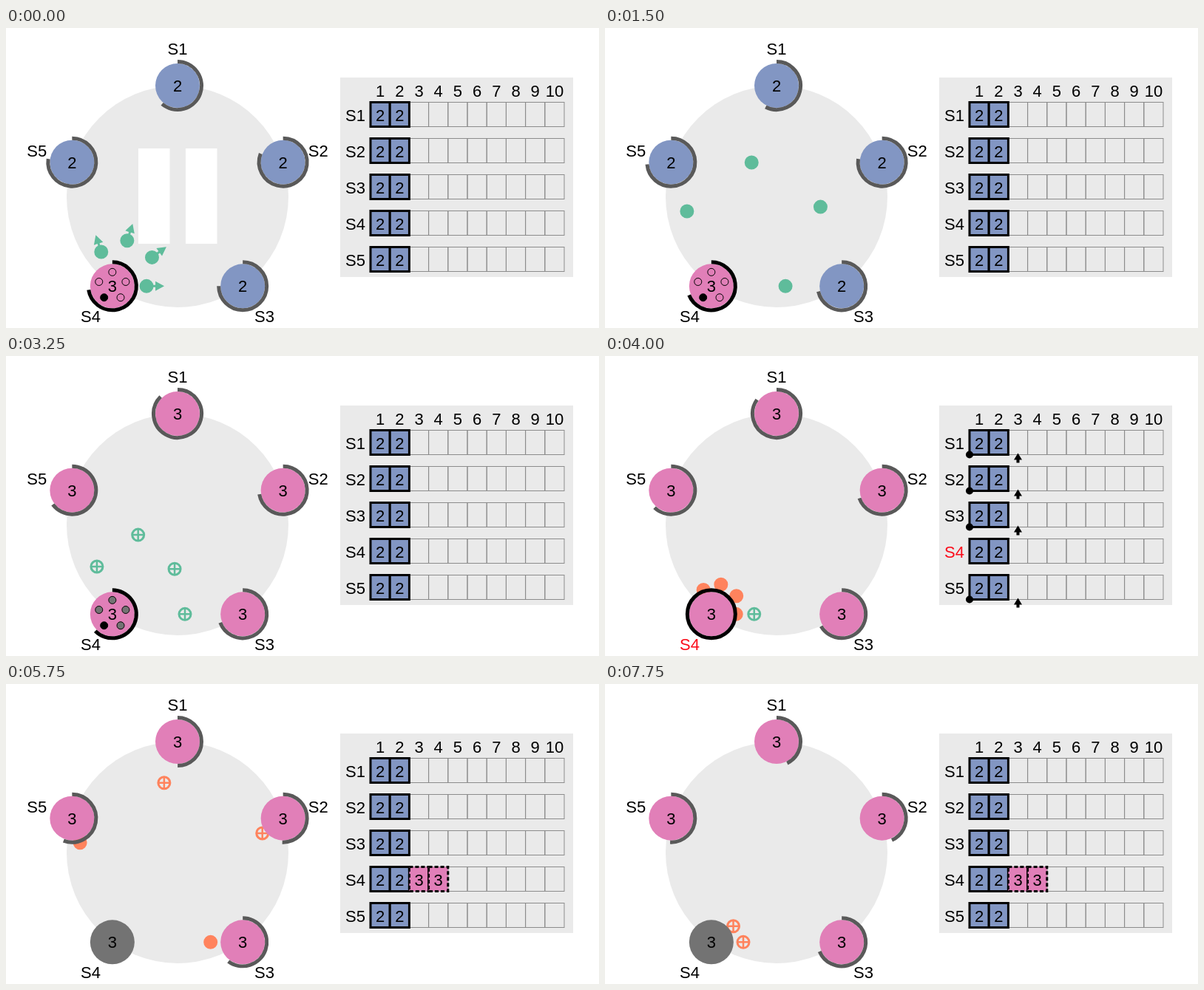
Write an HTML page that moves like this. It is 802 px wide and 406 px high and loops after 8000 ms.

```html
<!DOCTYPE html>
<html lang="en">
<head>
<meta charset="utf-8">
<title>Leader election</title>
<style>
  html, body { margin: 0; width: 100%; height: 100%; overflow: hidden; background: #fff; }
  svg { display: block; width: 100%; height: 100%; }
  text { font: 22px "Liberation Sans", Arial, sans-serif; text-anchor: middle; }
</style>
</head>
<body>
<svg id="stage" viewBox="0 0 802 406"></svg>
<script>
const LOOP = 8000, STEP = 250, HOLD = 750;
const PANEL = '#eaeaea', GREY = '#737373', RED = '#fb0d1b';
const TERM = { 2: '#8296c3', 3: '#e17fb8' };
const GREEN = '#5fbc9b', ORANGE = '#ff835d';
const CX = 232, CY = 228, R = 30;
const LEADER = 4, ELECTED = 13.7, ENTRIES = [18, 19], CRASH = 20;
const TURN = 3.25; // degrees a timer loses per step

// hops: request sent, request in, vote in, heartbeat sent, heartbeat in, ack in (steps)
// timer: arc angle at step 0, for each stretch between resets
const peers = {
  1: { hops: [-1.25, 6.85, 13.41, 13.66, 20.0, 27.85], timer: [220, 351, 248] },
  2: { hops: [-1.25, 6.51, 13.2, 13.62, 20.83, 29.25], timer: [291, 296, 250] },
  3: { hops: [-1.2, 7.41, 16.08, 13.76, 21.95, 29.9], timer: [270, 285, 341.5] },
  5: { hops: [-1.29, 6.74, 13.04, 13.7, 21.32, 27.5], timer: [278, 269, 276.5] }
};
const ids = [1, 2, 3, 4, 5];

const spot = (id, r, x = CX, y = CY) => {
  const a = (id - 1) * 2 * Math.PI / 5;
  return [x + r * Math.sin(a), y - r * Math.cos(a)];
};
const circle = (x, y, r, attrs) => `<circle cx="${x}" cy="${y}" r="${r}" ${attrs}/>`;
const rect = (x, y, w, h, attrs) => `<rect x="${x}" y="${y}" width="${w}" height="${h}" ${attrs}/>`;
const label = (x, y, s, fill = '#000') => `<text x="${x}" y="${y + 8}" fill="${fill}">${s}</text>`;
const isLeader = n => n >= ELECTED && n < CRASH;
const nameFill = (id, n) => id === LEADER && isLeader(n) ? RED : '#000';

function message(from, to, frac, color, reply, paused) {
  const [x0, y0] = spot(from, 150), [x1, y1] = spot(to, 150);
  const dist = Math.hypot(x1 - x0, y1 - y0);
  const k = (R + frac * (dist - 2 * R)) / dist;
  const x = x0 + (x1 - x0) * k, y = y0 + (y1 - y0) * k;
  const turn = Math.atan2(y1 - y0, x1 - x0) * 180 / Math.PI;
  let s = circle(0, 0, 8, `fill="${reply ? 'none' : color}" stroke="${color}" stroke-width="3"`);
  if (reply) s += `<path d="M-8 0H8M0-8V8" stroke="${color}" stroke-width="2.5"/>`;
  if (paused) s += `<path transform="rotate(${turn})" d="M8-1.5H12V-6.5L24 0L12 6.5V1.5H8Z" fill="${color}"/>`;
  return `<g transform="translate(${x} ${y})">${s}</g>`;
}

function messages(n) {
  let s = '';
  for (const id in peers) {
    const h = peers[id].hops;
    [0, 1, 3, 4].forEach(i => {
      if (n < h[i] || n >= h[i + 1]) return;
      const reply = i === 1 || i === 4;
      const frac = (n - h[i]) / (h[i + 1] - h[i]);
      s += message(reply ? +id : LEADER, reply ? LEADER : +id, frac,
        i < 3 ? GREEN : ORANGE, reply, n === 0);
    });
  }
  return s;
}

function arc(x, y, deg, color) {
  const r = R + 2.5, a = deg * Math.PI / 180;
  return `<path d="M${x} ${y - r}A${r} ${r} 0 ${deg > 180 ? 1 : 0} 1 ${x + r * Math.sin(a)} ${y - r * Math.cos(a)}"
    fill="none" stroke="${color}" stroke-width="5"/>`;
}

function votes(x, y, n) {
  return ids.map(id => {
    const h = id === LEADER ? null : peers[id].hops;
    const fill = !h || n >= h[2] ? '#000' : n >= h[1] ? GREY : 'none';
    const [vx, vy] = spot(id, 19, x, y);
    return circle(vx, vy, 5, `fill="${fill}" stroke="#000"`);
  }).join('');
}

function server(id, n) {
  const [x, y] = spot(id, 150), [lx, ly] = spot(id, 200);
  let term = 3, fill = TERM[3], rim = '', dots = '';
  if (id !== LEADER) {
    const { hops: h, timer } = peers[id];
    term = n < h[1] ? 2 : 3;
    fill = TERM[term];
    rim = arc(x, y, timer[n < h[1] ? 0 : n < h[4] ? 1 : 2] - TURN * n, '#595959');
  } else if (n >= CRASH) {
    fill = GREY;
  } else if (isLeader(n)) {
    rim = circle(x, y, R + 2.5, 'fill="none" stroke="#000" stroke-width="5"');
  } else {
    rim = arc(x, y, 261 - TURN * n, '#000');
    dots = votes(x, y, n);
  }
  return circle(x, y, R, `fill="${fill}"`) + rim + dots + label(x, y, term) +
    label(lx, ly, 'S' + id, nameFill(id, n));
}

function logs(n) {
  const x0 = 493, w = 26.2, h = 33;
  let s = rect(452, 67, 315, 270, `fill="${PANEL}"`);
  for (let i = 0; i < 10; i++) s += label(x0 + w * (i + .5), 85, i + 1);
  for (const id of ids) {
    const y = 100.5 + 49 * (id - 1), mid = y + h / 2 + .5;
    s += label(472.5, mid, 'S' + id, nameFill(id, n));
    for (let i = 0; i < 10; i++) s += rect(x0 + w * i, y, w, h, 'fill="none" stroke="#8c8c8c"');
    const terms = [2, 2];
    if (id === LEADER) ENTRIES.forEach(t => n >= t && terms.push(3));
    terms.forEach((t, i) => {
      const dash = t === 3 ? 'stroke-dasharray="5 3"' : '';
      s += rect(x0 + w * i, y, w, h, `fill="${TERM[t]}" stroke="#000" stroke-width="3" ${dash}`) +
        label(x0 + w * (i + .5), mid, t);
    });
    if (isLeader(n) && id !== LEADER) {
      s += circle(x0, y + h, 5, '') +
        `<path d="M${x0 + w * 2.5} ${y + h - 2}l5.5 9h-3.5v4h-4v-4h-3.5Z"/>`;
    }
  }
  return s;
}

function draw(n) {
  const bars = n === 0 ? [179, 243].map(x => rect(x, 163, 42.5, 129, 'fill="#fff"')).join('') : '';
  return circle(CX, CY, 150, `fill="${PANEL}"`) + bars + messages(n) +
    ids.map(id => server(id, n)).join('') + logs(n);
}

const stage = document.getElementById('stage');
const start = performance.now();
let shown = -1;
function tick() {
  const t = (performance.now() - start) % LOOP;
  const n = t < HOLD ? 0 : Math.floor((t - HOLD) / STEP) + 1;
  if (n !== shown) stage.innerHTML = draw(shown = n);
  requestAnimationFrame(tick);
}
tick();
</script>
</body>
</html>
```
